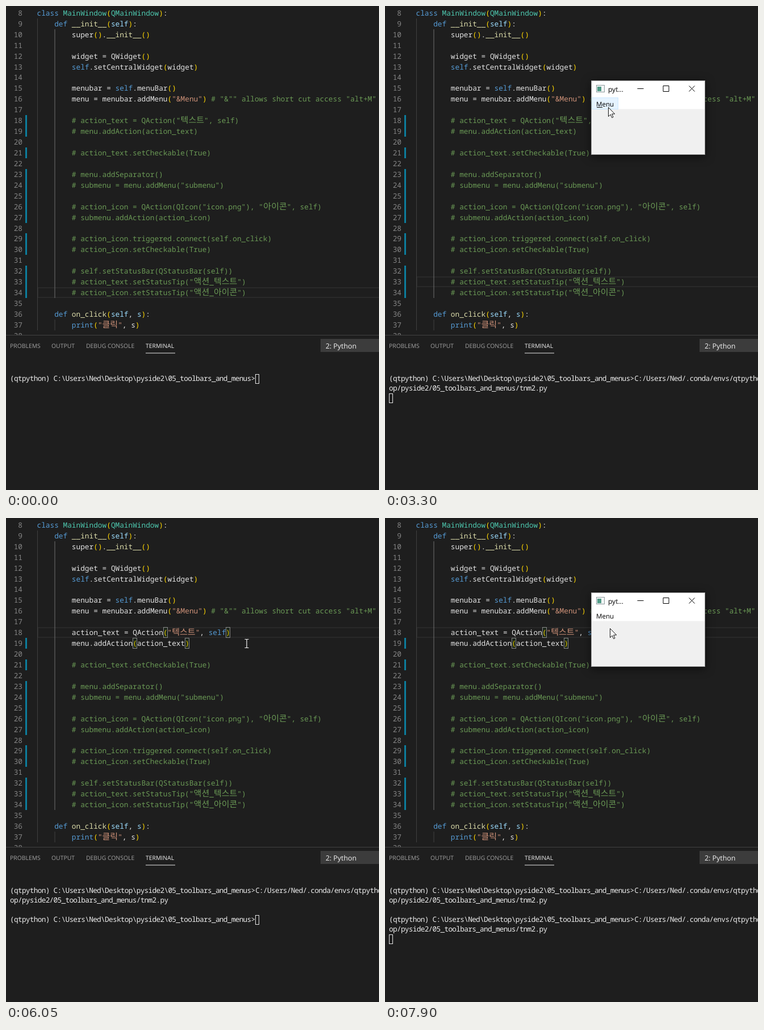
These frames come from a looping animation (657 by 852 pixels, 8000 ms). An HTML page:

```html
<!DOCTYPE html>
<html lang="en">
<head>
<meta charset="utf-8">
<title>Menu bar demo</title>
<style>
html, body { margin: 0; width: 100%; height: 100%; overflow: hidden; background: #1e1e1e; }
svg { display: block; text-rendering: geometricPrecision; }
.code { font: 500 12.78px 'Noto Sans Mono', monospace; fill: #e4e4e4; }
.ko { font: 300 15px 'Noto Sans CJK KR', 'Noto Sans CJK JP', 'Noto Sans CJK', sans-serif; }
.num { fill: #858585; text-anchor: end; font-weight: 400; }
.code .key { fill: #569cd6; }
.code .type { fill: #4ec9b0; }
.code .fn { fill: #dcdcaa; }
.code .arg { fill: #9cdcfe; }
.code .str { fill: #ce9178; }
.code .rem { fill: #6a9955; }
.code .par { fill: #ffd700; }
.term { font: 500 12.78px 'Noto Sans Mono', monospace; letter-spacing: -.7px; fill: #ececec; }
.ui { font-family: 'Open Sans', 'Noto Sans', sans-serif; }
.tab { font-size: 10.4px; fill: #a2a2a2; }
.match { fill: rgba(0, 100, 0, .1); stroke: #888; }
.line { fill: none; stroke: #000; }
</style>
</head>
<body>
<svg id="stage" width="657" height="852" viewBox="0 0 657 852">
  <rect width="657" height="852" fill="#1e1e1e"/>
  <rect id="current" x="56" width="620" height="17" fill="none" stroke="#292929" stroke-width="2"/>
  <g id="guides"></g>
  <g id="code" class="code"></g>
  <g id="matches"></g>
  <g id="carets" fill="#c8c8c6"></g>

  <rect y="579" width="657" height="273" fill="#1e1e1e"/>
  <rect y="579" width="657" height="1" fill="#414141"/>
  <g class="ui">
    <text class="tab" x="7" y="602">PROBLEMS</text>
    <text class="tab" x="80" y="602">OUTPUT</text>
    <text class="tab" x="141" y="602">DEBUG CONSOLE</text>
    <text class="tab" x="246" y="602" style="fill:#f0f0f0">TERMINAL</text>
    <rect x="246" y="610.5" width="52" height="1" fill="#e7e7e7"/>
    <rect x="554" y="586" width="103" height="23" fill="#3c3c3c"/>
    <text x="563" y="603" font-size="12.4" fill="#f4f4f4">2: Python</text>
  </g>
  <g id="term" class="term"></g>
  <rect id="block" width="6" height="16" fill="none" stroke="#e5e5e5"/>

  <g id="win" class="ui">
    <rect x="363.5" y="131.5" width="200" height="130" fill="#f0f0f0" stroke="#999" style="filter:drop-shadow(0 3px 8px rgba(0,0,0,.55))"/>
    <rect x="364" y="132" width="199" height="49.5" fill="#fff"/>
    <rect x="372.5" y="139.5" width="14" height="12" fill="#f4f6f6" stroke="#8d9a9e"/>
    <rect x="374" y="142" width="7" height="8" fill="#4f9a86"/>
    <text x="393" y="150.5" font-size="12">pyt...</text>
    <rect id="close" x="518" y="132" width="45" height="29"/>
    <path class="line" d="M444.500 145.500h11M490 140.500h10v10h-10z"/>
    <path id="cross" class="line" d="M535.500 140.500l10 10m0-10l-10 10"/>
    <rect id="hover" x="364.5" y="161.500" width="46" height="20" fill="#e5f3ff" stroke="#cce8ff"/>
    <text x="372" y="176.500" font-size="11.6">Menu</text>
    <path id="mnemonic" class="line" d="M373 178.500h10"/>
  </g>

  <g id="mouse">
    <circle id="click" r="12" fill="#fbb826" opacity=".88"/>
    <path id="arrow" d="M.5 .5V16.500L4.200 13L6.700 18.600L9 17.600L6.600 12H11.700Z" fill="#fff" stroke="#111"/>
    <path id="beam" d="M-3.500-7.500h2.500q1 0 1 1q0-1 1-1h2.500M0-7v14M-3.500 7.500h2.500q1 0 1-1q0 1 1 1h2.500" fill="none" stroke="#f4f4f4" stroke-width="1.2"/>
    <circle id="busy" cx="-2" cy="-1" r="7.500" fill="#fff" stroke="#2f98ea" stroke-width="5"/>
  </g>
</svg>

<script>
const $ = id => document.getElementById(id);
const LOOP = 8000, LEFT = 54.5, CHAR = 7.67, WIDE = 13.8;
const rowTop = n => Math.round(192.2 + (n - 18) * 18.93);

function add(parent, tag, attrs, text) {
  const el = document.createElementNS('http://www.w3.org/2000/svg', tag);
  for (const k in attrs) el.setAttribute(k, attrs[k]);
  if (text) el.textContent = text;
  return parent.appendChild(el);
}

const source = `class MainWindow(QMainWindow):
    def __init__(self):
        super().__init__()

        widget = QWidget()
        self.setCentralWidget(widget)

        menubar = self.menuBar()
        menu = menubar.addMenu("&Menu") # "&"" allows short cut access "alt+M"

        # action_text = QAction("텍스트", self)
        # menu.addAction(action_text)

        # action_text.setCheckable(True)

        # menu.addSeparator()
        # submenu = menu.addMenu("submenu")

        # action_icon = QAction(QIcon("icon.png"), "아이콘", self)
        # submenu.addAction(action_icon)

        # action_icon.triggered.connect(self.on_click)
        # action_icon.setCheckable(True)

        # self.setStatusBar(QStatusBar(self))
        # action_text.setStatusTip("액션_텍스트")
        # action_icon.setStatusTip("액션_아이콘")

    def on_click(self, s):
        print("클릭", s)
`.split('\n');

const words = {
  class: 'key', def: 'key', self: 'key', print: 'key',
  MainWindow: 'type', QMainWindow: 'type',
  __init__: 'fn', on_click: 'fn'
};

function kind(token, line) {
  if (token[0] === '#') return 'rem';
  if (token[0] === '"') return 'str';
  if (/[()]/.test(token)) return 'par';
  if (/^\s*def/.test(line) && /^(self|s)$/.test(token)) return 'arg';
  return words[token] || '';
}

// Draws one line of code; g.end is the x just after its last character.
function drawRow(n, line) {
  const g = add($('code'), 'g', {});
  let x = LEFT;
  for (const token of line.match(/#.*|"[^"]*"|\w+|\s+|./g) || []) {
    const cls = kind(token, line);
    for (const part of token.match(/[가-힣]+|[^가-힣]+/g)) {
      const wide = /[가-힣]/.test(part);
      if (part.trim()) {
        add(g, 'text', { x, y: rowTop(n) + 14, class: cls + (wide ? ' ko' : '') }, part);
      }
      x += part.length * (wide ? WIDE : CHAR);
    }
  }
  g.end = x;
  return g;
}

const rows = {};
source.forEach((line, i) => {
  const n = i + 8;
  rows[n] = drawRow(n, line);
  add($('code'), 'text', { x: 29, y: rowTop(n) + 14, class: 'num' }, String(n));
});
const plain18 = drawRow(18, source[10].replace('# ', ''));
const plain19 = drawRow(19, source[11].replace('# ', ''));

function bar(x, w, from, to, fill) {
  const y = rowTop(from);
  return add($('guides'), 'rect', { x, y, width: w, height: rowTop(to + 1) - y, fill });
}
bar(55, 1, 9, 37, '#404040');
bar(85.5, 1, 10, 34, '#707070');
bar(85.5, 1, 37, 37, '#404040');
const CHANGED = '#0c7d9d';
const mark18 = bar(34, 3, 18, 18, CHANGED);
[[19, 19], [21, 21], [23, 27], [29, 30], [32, 34]].forEach(([a, b]) => bar(34, 3, a, b, CHANGED));

function match(n, x) {
  add($('matches'), 'rect', { x: Math.round(x) + .5, y: rowTop(n) + .5, width: 7, height: 18, class: 'match' });
}
match(18, LEFT + 29 * CHAR);
match(18, plain18.end - CHAR);
match(19, LEFT + 22 * CHAR);
match(19, plain19.end - CHAR);

const caret = (n, row) => add($('carets'), 'rect', { x: Math.floor(row.end), y: rowTop(n), width: 2, height: 19 });

// Terminal
const prompt = '(qtpython) C:\\Users\\Ned\\Desktop\\pyside2\\05_toolbars_and_menus>';
const command = 'C:/Users/Ned/.conda/envs/qtpython/python.exe';
const TERM_CHAR = 6.97;
const termX = col => 7 + col * TERM_CHAR;
const print = (col, row, text) => add($('term'), 'text', { x: termX(col), y: 660 + 17 * row }, text);
const run = row => [
  print(prompt.length, row, command),
  print(0, row + 1, 'op/pyside2/05_toolbars_and_menus/tnm2.py')
];
print(0, 0, prompt);

// Elements with the spans of time in which they show
const shown = [];
const during = (el, ...spans) => shown.push([el, spans]);
during(caret(33, rows[33]), [450, 750], [1100, 1400], [4300, 4600]);
during(caret(18, rows[18]), [4750, 5450]);
during(caret(19, rows[19]), [5150, 5450]);
during(caret(18, plain18), [5700, 6050], [6350, 6650]);
during(caret(19, plain19), [5700, 6050], [6350, 6650]);
[rows[18], rows[19]].forEach(el => during(el, [0, 5700]));
[plain18, plain19].forEach(el => during(el, [5700, LOOP]));
during(mark18, [0, 5850]);
during($('matches'), [5750, LOOP]);
run(0).forEach(el => during(el, [950, LOOP]));
during(print(0, 3, prompt), [4300, LOOP]);
run(3).forEach(el => during(el, [6200, LOOP]));
during($('mnemonic'), [2700, 3750]);
during($('click'), [450, 500], [4150, 4250], [4750, 4850], [5150, 5200]);

// Mouse: time, x, y
const path = [
  [0, 600, 900], [100, 551, 831], [300, 461, 484], [1550, 461, 484], [1950, 441, 279],
  [2350, 390, 179], [2800, 390, 179], [3050, 397, 181], [3300, 393, 178], [3500, 387, 181],
  [3650, 394, 180], [3700, 394, 180], [3950, 548, 156], [4450, 548, 156], [4600, 438, 202],
  [4900, 438, 202], [5100, 424, 221], [7000, 424, 221], [7150, 402, 190], [7300, 402, 190],
  [7450, 385, 172], [7650, 451, 153], [7750, 451, 153], [7800, 415, 175], [7900, 396, 194],
  [LOOP, 396, 194]
];

function mouseAt(t) {
  const i = path.findIndex(p => p[0] > t);
  const [t0, x0, y0] = path[i - 1], [t1, x1, y1] = path[i];
  const k = (t - t0) / (t1 - t0);
  return [Math.round(x0 + (x1 - x0) * k), Math.round(y0 + (y1 - y0) * k)];
}

function winOpacity(t) {
  const ramp = start => Math.min(1, .35 + (t - start) / 150);
  if (t >= 6850) return ramp(6850);
  if (t < 1600 || t >= 4300) return 0;
  return t >= 4200 ? 1 - (t - 4150) / 150 : ramp(1600);
}

const show = (el, on) => { el.style.display = on ? '' : 'none'; };

function draw(now) {
  const t = Math.floor(now % LOOP / 50) * 50;
  for (const [el, spans] of shown) show(el, spans.some(([a, b]) => t >= a && t < b));

  $('current').setAttribute('y', rowTop(t < 450 ? 34 : t < 4750 ? 33 : 18) + 1);

  const [col, row] = t < 950 ? [prompt.length, 0] : t < 4300 ? [0, 2] : t < 6200 ? [prompt.length, 3] : [0, 5];
  $('block').setAttribute('x', Math.round(termX(col)) + .5);
  $('block').setAttribute('y', 648.5 + 17 * row);

  const open = winOpacity(t), [x, y] = mouseAt(t);
  show($('win'), open > 0);
  $('win').setAttribute('opacity', open);

  const inside = open > 0 && x >= 364 && x < 563 && y >= 132 && y < 261;
  const busy = t >= 6850 && t < 7050;
  const onClose = inside && x >= 518 && y < 161;
  show($('hover'), inside && x < 411 && y >= 161 && y < 182);
  $('close').setAttribute('fill', !onClose ? '#fff' : t < 4150 ? '#e81123' : '#f1707a');
  $('cross').style.stroke = onClose ? '#fff' : '#000';

  $('mouse').setAttribute('transform', `translate(${x} ${y})`);
  show($('busy'), busy);
  show($('arrow'), inside && !busy);
  show($('beam'), !inside);
}

const start = performance.now();
function tick() {
  draw(performance.now() - start);
  requestAnimationFrame(tick);
}
tick();
</script>
</body>
</html>
```
